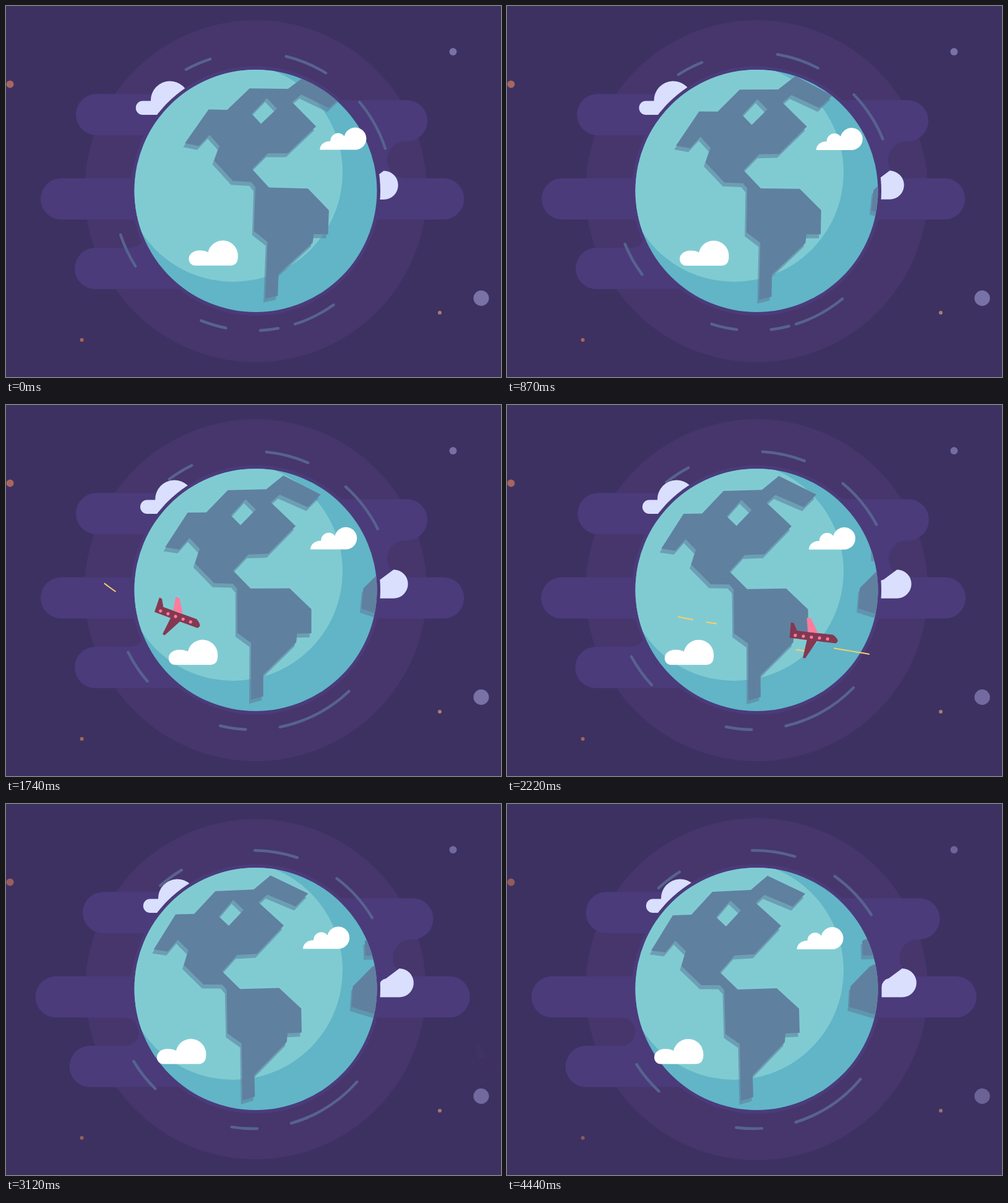
An HTML page that plays this animation: 800 px wide and 600 px high, repeating every 4.47 s.

```html
<!DOCTYPE html>
<html lang="en">
<head>
<meta charset="utf-8">
<title>Plane around the globe</title>
<style>
  html, body { margin: 0; width: 100%; height: 100%; overflow: hidden; background: #3d3162; }
  svg { display: block; width: 100%; height: 100%; }
  #pills, #halo { fill: #4b3b7b; }
  #rings path { fill: none; stroke: #57628f; stroke-width: 4.5; stroke-linecap: round; }
  #trails path { fill: none; stroke: #f7d06a; stroke-width: 2; }
  .back { fill: #d9dffd; }
  .front { fill: #fff; }
  .land { fill: #6080a0; fill-rule: evenodd; }
  .shade { opacity: .6; }
  .hull { fill: #843852; }
  .wing { fill: #ff7b9b; }
</style>
</head>
<body>
<svg viewBox="0 0 800 600" xmlns="http://www.w3.org/2000/svg">
  <defs>
    <clipPath id="disc"><circle cx="403.5" cy="299" r="196"/></clipPath>
    <path id="continents" d="M233 237 268 180 298 179 332 142 394 139 421 116 482 145 462 166 416 147 402 160
      443 197 400 243 368 245 344 272 373 300 436 298 472 331 473 370 450 371 449 385 397 439 398 474 378 480
      376 388 353 372 351 301 344 293 314 293 282 262 289 238 272 221 256 240Z
      M361 156 378 172 354 198 338 183Z
      M610 252 586 263 555 295 553 328 610 345Z
      M574 221 610 208 610 244 575 245Z"/>
  </defs>

  <rect width="800" height="600" fill="#3d3162"/>
  <circle id="aura" cx="403.5" cy="299.5" r="276" fill="#46366c"/>

  <g id="stars">
    <circle cx="722.5" cy="74" r="6" fill="#7972a6"/>
    <circle cx="768" cy="472.5" r="12.5" fill="#7972a6"/>
    <circle cx="6.5" cy="126.5" r="6" fill="#a8675e"/>
    <circle cx="701" cy="496" r="3" fill="#a87d72"/>
    <circle cx="122.5" cy="540" r="3" fill="#a8665c"/>
  </g>

  <path id="pills"/>
  <g id="rings"></g>

  <path id="cloudNW" class="back" d="M221 176A11.25 11.25 0 0 1 221 153.500H234A31 31 0 0 1 296 151.500V176Z"/>
  <path id="cloudE" class="back" d="M577.500 313V296A14 14 0 0 1 589 282.600L610.500 266.500A23.250 23.250 0 0 1 610.500 313Z"/>
  <circle id="halo" cx="403.500" cy="299" r="201.500"/>

  <g clip-path="url(#disc)">
    <rect x="200" y="95" width="410" height="410" fill="#61b5c7"/>
    <circle cx="367" cy="269" r="177" fill="#80cbd2"/>
    <g id="land">
      <use href="#continents" class="land shade" x="-2.500" y="6.500"/>
      <use href="#continents" class="land"/>
    </g>
  </g>

  <path id="cloudSW" class="front" d="M10.500 0C4 0 0-5 0-11C0-19 8-24.500 17-24.500C23-24.500 28-23.500 31-21.500
    A24.500 24.500 0 0 1 79.300-14C79.300-5 75 0 67 0Z"/>
  <path id="cloudNE" class="front" d="M0 0C0-8 7-14 17-14A12.500 12.500 0 0 1 39.500-22A18 18 0 1 1 57 0Z"/>

  <g id="trails"></g>
  <g id="plane">
    <path class="hull" d="M-36.800-21-32-20.300-25-8.100 35.200-8Q43-4 44.700 1.500L42 5.700 9.900 5.500-6.500 36.500-10.500 35.700-7 5.400-36.300 5Z"/>
    <path class="wing" d="M-11.300-31.500-4.300-31.400 10.200-8H-7Z"/>
    <g id="dots" class="wing"></g>
  </g>
</svg>

<script>
const LOOP = 4470, LAST = 4440, STEP = 30;
const SVG = 'http://www.w3.org/2000/svg';
const $ = id => document.getElementById(id);
const clamp = x => Math.min(1, Math.max(0, x));
const smooth = (t, a, b) => { const u = clamp((t - a) / (b - a)); return u * u * (3 - 2 * u); };

function add(parent, tag, attrs = {}) {
  const el = document.createElementNS(SVG, tag);
  for (const k in attrs) el.setAttribute(k, attrs[k]);
  return parent.appendChild(el);
}
const set = (el, name, value) => el.setAttribute(name, value);
const move = (id, x, y) => set($(id), 'transform', `translate(${x} ${y})`);

// Steady speed first, then an even slowdown to rest
function glide(u) {
  const a = .38, v = 2 / (1 + a);
  return u < a ? v * u : 1 - v * (1 - u) ** 2 / (2 * (1 - a));
}

// Smooth curve through [position, value] keys, held at both ends
function curve(keys, x) {
  const n = keys.length - 1;
  if (x <= keys[0][0]) return keys[0][1];
  if (x >= keys[n][0]) return keys[n][1];
  let i = 0;
  while (x > keys[i + 1][0]) i++;
  const slope = k => {
    const p = keys[Math.max(0, k - 1)], q = keys[Math.min(n, k + 1)];
    return (q[1] - p[1]) / (q[0] - p[0]);
  };
  const [x0, y0] = keys[i], [x1, y1] = keys[i + 1], h = x1 - x0, u = (x - x0) / h, w = 1 - u;
  return w * w * (1 + 2 * u) * y0 + u * u * (3 - 2 * u) * y1 + u * w * h * (w * slope(i) - u * slope(i + 1));
}

// Ring strokes: start and end in degrees; "fixed" keeps the end from turning
const rings = [
  { a: -76.2, b: -58.4 }, { a: -40, b: -18 }, { a: 79.5, b: 87 },
  { a: 54.6, b: 72.4, fixed: true },
  { a: 101.2, b: 111.8 }, { a: 147.5, b: 161.9 }, { a: -118.7, b: -107.8 }
].map(r => ({ ...r, el: add($('rings'), 'path') }));

function drawRing(r, turn) {
  const at = deg => {
    const q = deg * Math.PI / 180;
    return `${399 + 225 * Math.cos(q)} ${300 + 225 * Math.sin(q)}`;
  };
  set(r.el, 'd', `M${at(r.a + turn)}A225 225 0 0 1 ${at(r.b + (r.fixed ? 0 : turn))}`);
}

// Flight: path by x, progress and tilt by time
const height = [[110, 250], [195, 313], [274, 342], [492, 375.5], [658.5, 403], [790, 424]];
const flightX = [[1380, 110], [1560, 192], [1740, 274], [2220, 492], [2730, 658.5], [3200, 790]];
const tilt = [[1380, 38], [1740, 20], [2220, 6.3], [2730, 3.3], [3200, 3]];
const size = [[1740, .95], [2220, .965], [2730, 1]];

for (let i = -2; i <= 2; i++) add($('dots'), 'circle', { cx: i * 13.6, cy: 0, r: 2.7 });

// Trails pass x at 2220 ms, growing and shrinking over their life
const trails = [
  { from: 1580, to: 2450, x: 288.5, v: .251, len: 34, dy: 0 },
  { from: 1850, to: 2400, x: 330.5, v: .3, len: 20, dy: 0 },
  { from: 2050, to: 2500, x: 476, v: .35, len: 19.5, dy: 24 },
  { from: 2000, to: 2600, x: 557, v: .4, len: 63, dy: 12 }
].map(s => ({ ...s, el: add($('trails'), 'path') }));

function drawTrail(s, t) {
  const u = (t - s.from) / (s.to - s.from);
  if (u <= 0 || u >= 1) return set(s.el, 'd', '');
  const len = s.len * Math.sin(Math.PI * u), mid = s.x + s.v * (t - 2220);
  let d = '';
  for (let i = 0; i <= 6; i++) {
    const x = mid + len * (i / 6 - .5);
    d += `${i ? 'L' : 'M'}${x} ${curve(height, x) + s.dy}`;
  }
  set(s.el, 'd', d);
}

const R = 33.4;
const capLeft = (x, y) => `M403 ${y}H${x + R}a${R} ${R} 0 0 0 0 ${2 * R}H403Z`;
const capRight = (x, y) => `M403 ${y}H${x - R}a${R} ${R} 0 0 1 0 ${2 * R}H403Z`;

function drawPills(t) {
  const k = smooth(t, 1900, 4300), w = 16.5 * k, e = 18.5 * k;
  set($('pills'), 'd',
    capLeft(113 + 14.5 * smooth(t, 1900, 3700), 142.2) +
    capRight(681 + e, 152.2) +
    capLeft(56 - w, 278.5) + capRight(740.3 + e, 278.5) +
    capLeft(111 - w, 391) +
    `M403 218H${645.5 + e}v1a29.800 29.800 0 0 0 0 59.600v1H403Z` +
    `M403 344H${201 - w}v1.300a22.850 22.850 0 0 1 0 45.700v1H403Z`);
}

const twinkle = [
  [[1600, 1], [2730, .88], [3600, .88], [4440, .8]],
  [[1900, 1], [2730, .8], [3600, 1], [4440, .77]],
  [[2100, 1], [3600, .8], [4440, .8]],
  [[2100, 1], [3600, .9], [4440, .85]],
  [[1700, 1], [3600, .82], [4440, .75]]
];

function draw(t) {
  const u = Math.min(1, t / LAST), g = glide(u);

  set($('aura'), 'r', curve([[2730, 276.5], [3600, 274], [4440, 276.5]], t));
  [...$('stars').children].forEach((s, i) => set(s, 'opacity', curve(twinkle[i], t)));
  drawPills(t);
  rings.forEach(r => drawRing(r, -14.5 * g));

  set($('land'), 'transform', `rotate(${3.5 * (1 - g)} 507 1147)`);
  move('cloudNW', 15 * (u + g) / 2, 0);
  move('cloudE', 28 * g, -.5 * g);
  move('cloudSW', 295.5 - 57.5 * g, 419.7 + .8 * g);
  move('cloudNE', 507.3 - 38.8 * u, 232.5 + 2.6 * u);

  trails.forEach(s => drawTrail(s, t));
  const x = curve(flightX, t);
  set($('plane'), 'transform',
    `translate(${x} ${curve(height, x)}) rotate(${curve(tilt, t)}) scale(${curve(size, t)})`);
  set($('plane'), 'opacity', smooth(t, 1400, 1560) * (1 - smooth(t, 2650, 3150)));
}

const start = performance.now();
function tick() {
  const t = (performance.now() - start) % LOOP;
  draw(Math.floor(t / STEP) * STEP);
  requestAnimationFrame(tick);
}
tick();
</script>
</body>
</html>
```
